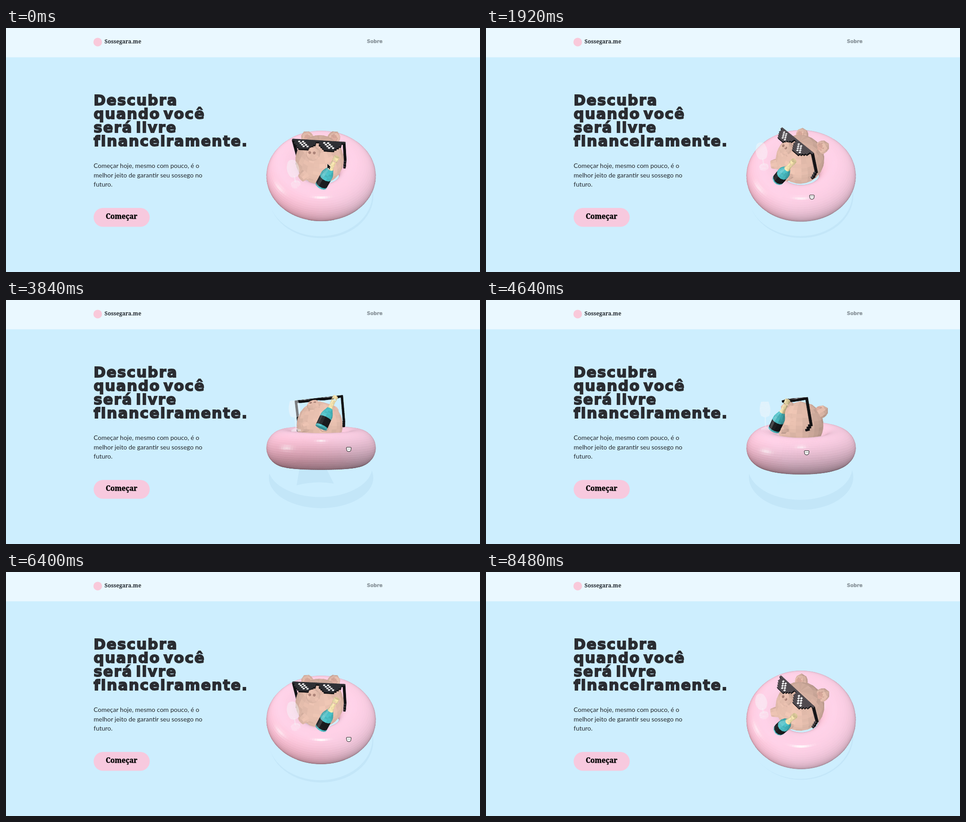
These frames come from a looping animation (1044 by 537 pixels, 8.64 s). An HTML page with a canvas:

```html
<!DOCTYPE html>
<html lang="pt-BR">
<head>
<meta charset="utf-8">
<title>Sossegara.me</title>
<style>
  html, body { margin: 0; width: 100%; height: 100%; overflow: hidden; background: #cdeefe; }
  svg, canvas { position: absolute; left: 0; top: 0; width: 1044px; height: 537px; display: block; }
  .wide { font-family: "DejaVu Sans", sans-serif; font-weight: 700; }
  .slab { font-family: "Noto Serif", serif; font-weight: 900; }
  .title { font-size: 32px; letter-spacing: 2px; word-spacing: -6px; fill: #2a2c31; stroke: #2a2c31; stroke-width: 2px; }
  .copy { font: 14px Lato, sans-serif; fill: #24292e; }
</style>
</head>
<body>
<svg viewBox="0 0 1044 537">
  <rect width="1044" height="64.500" fill="#eaf8ff"/>
  <circle cx="202" cy="31" r="9.500" fill="#f9c9da"/>
  <text class="slab" x="217" y="34" font-size="11.8" fill="#22282e">Sossegara.me</text>
  <text class="wide" x="795" y="33" font-size="10.4" fill="#8f9aa1" stroke="#8f9aa1" stroke-width=".5">Sobre</text>
  <g class="wide title">
    <text x="193" y="170">Descubra</text>
    <text x="193" y="200">quando você</text>
    <text x="193" y="230">será livre</text>
    <text x="193" y="260">financeiramente.</text>
  </g>
  <g class="copy">
    <text x="193" y="308">Começar hoje, mesmo com pouco, é o</text>
    <text x="193" y="329">melhor jeito de garantir seu sossego no</text>
    <text x="193" y="349">futuro.</text>
  </g>
  <rect x="193" y="396" width="123.500" height="41.500" rx="20.700" fill="#f7c9de"/>
  <text class="slab" x="254.500" y="420" font-size="15.5" text-anchor="middle" stroke="#000" stroke-width=".4">Começar</text>
</svg>
<canvas id="stage" width="1044" height="537"></canvas>
<script>
const ctx = document.getElementById('stage').getContext('2d');
const LOOP = 8640, STEP = 160, CX = 694, CY = 325.5, DIST = 700;
const GRAB = 480, DROP = 7360, GONE = 8000;

// Camera poses: time, azimuth, elevation.
const POSES = [
  [GRAB, 0, 47.7], [1920, -42, 49], [3040, -70, 50.3], [3840, 0, 5.7],
  [5440, -110, 20.5], [6400, 0, 45.4], [DROP, -40, 58.2]
];

const add = (a, b, k = 1) => a.map((v, i) => v + b[i] * k);
const dot = (a, b) => a[0] * b[0] + a[1] * b[1] + a[2] * b[2];
const cross = (a, b) => [a[1] * b[2] - a[2] * b[1], a[2] * b[0] - a[0] * b[2], a[0] * b[1] - a[1] * b[0]];
const norm = a => { const l = Math.hypot(...a) || 1; return a.map(v => v / l); };
const mix = (a, b, k) => a.map((v, i) => v + (b[i] - v) * k);
const clamp = (v, lo = 0, hi = 1) => Math.min(hi, Math.max(lo, v));
const ease = (a, b, v) => { const k = clamp((v - a) / (b - a)); return k * k * (3 - 2 * k); };
const times = (n, fn) => Array.from({ length: n }, (_, i) => fn(i));

let seed = 7;
const rand = () => (seed = seed * 16807 % 2147483647) / 2147483647;

// ---- model ----
const WHITE = [255, 255, 255], SKIN = [236, 195, 178], DARK = [48, 49, 54];
const TEAL = [70, 185, 192], LABEL = [22, 24, 27], FOIL = [237, 219, 166];
const faces = [];

function face(pts, mid, mat, col, extra) {
  const c = [0, 1, 2].map(i => pts.reduce((s, p) => s + p[i], 0) / pts.length);
  let n = norm(cross(add(pts[2], pts[0], -1), add(pts[3], pts[1], -1)));
  if (dot(n, add(c, mid, -1)) < 0) n = n.map(v => -v);
  faces.push({ pts, c, n, mat, col, j: rand() - .5, ...extra });
}

// Surface of revolution from p to q with radius(t), closed at both ends.
function lathe(p, q, radius, rows, sides, mat, col, extra) {
  const w = add(q, p, -1), mid = add(p, w, .5);
  const u = norm(cross(w, Math.abs(w[0]) > Math.abs(w[1]) ? [0, 1, 0] : [1, 0, 0]));
  const v = norm(cross(w, u));
  const rings = times(rows + 1, i => [i / rows, radius(i / rows)]);
  const shape = [[0, 0], ...rings, [1, 0]];
  const at = ([t, r], j) => {
    const g = j / sides * Math.PI * 2;
    return add(add(add(p, w, t), u, r * Math.cos(g)), v, r * Math.sin(g));
  };
  for (let i = 0; i + 1 < shape.length; i++) {
    const a = shape[i], b = shape[i + 1];
    if (a[0] === b[0] && a[1] === b[1]) continue;
    for (let j = 0; j < sides; j++)
      face([at(a, j), at(a, j + 1), at(b, j + 1), at(b, j)], mid, mat,
        typeof col === 'function' ? col((a[0] + b[0]) / 2) : col, extra);
  }
}

function ball(c, axis, r, rows, sides, col = SKIN) {
  lathe(add(c, axis, -1), add(c, axis), t => 2 * r * Math.sqrt(t * (1 - t)), rows, sides, 'skin', col);
}

function torus(R, r, nu, nv) {
  const at = (i, j, k = r) => {
    const g = i / nu * Math.PI * 2, h = j / nv * Math.PI * 2, d = R + k * Math.cos(h);
    return [d * Math.cos(g), k * Math.sin(h), d * Math.sin(g)];
  };
  for (let i = 0; i < nu; i++)
    for (let j = 0; j < nv; j++)
      face([at(i, j), at(i + 1, j), at(i + 1, j + 1), at(i, j + 1)], at(i + .5, 0, 0),
        'rubber', [255, 209, 231], { flat: true });
}

// Frame of the sunglasses: right, up, out of the lens.
const RIGHT = norm([.97, .1, .2]), UP = norm([.18, .146, -.955]), OUT = norm([-.1, .98, .14]);
const SPEC = [-6, 106, 7], PX = 3.85;

function pixel(x, y, z, col) {
  const h = PX / 2, axes = [RIGHT, UP, OUT];
  const c = add(add(add(SPEC, RIGHT, x * PX), UP, y * PX), OUT, z * PX);
  for (let k = 0; k < 3; k++)
    for (const s of [-h, h]) {
      const o = add(c, axes[k], s), a = axes[(k + 1) % 3], b = axes[(k + 2) % 3];
      face([[-h, -h], [h, -h], [h, h], [-h, h]].map(([m, n]) => add(add(o, a, m), b, n)), c, 'plastic', col);
    }
}

function glasses() {
  for (let x = 0; x < 26; x++) pixel(x - 12.5, 0, 0, DARK);
  for (const start of [1, 14])
    for (let row = 1; row < 6; row++) {
      const cut = Math.max(0, row - 2);
      for (let k = cut; k < 11 - cut; k++) {
        const check = row < 5 && k > row && k < row + 5 && (k + row) % 2;
        pixel(start + k - 12.5, -row, 0, check ? WHITE : DARK);
      }
    }
  for (const x of [-13, 13.3])
    for (let i = 0; i < 17; i++) {
      const drop = Math.max(0, i - 13);
      pixel(x, -drop, -i, DARK);
      if (drop) pixel(x, 1 - drop, -i, DARK);
    }
}

function pig() {
  const body = [-3, 50, 0], snout = norm([-.25, .82, .5]), tip = add(body, snout, 57);
  ball(body, [0, 51, 0], 50, 14, 24);
  lathe(add(body, snout, 40), tip, t => 14 - 3 * t ** 4, 4, 12, 'skin', SKIN);
  for (const s of [-4.5, 4.5]) {
    const p = add(tip, RIGHT, s);
    lathe(p, add(p, snout), () => 2.4, 1, 7, 'skin', [176, 134, 123]);
  }
  for (const x of [-28, 26]) {
    const ear = [x, 79, -34];
    ball(ear, norm(add(ear, body, -1)).map(v => v * 16), 13, 6, 10);
    ball(add(ear, [0, 5, 5]), [0, 6, 6], 8, 4, 8, [222, 174, 160]);
  }
  const limb = (a, b) => lathe(a, b, t => 12 - 4 * t * t, 4, 9, 'skin', SKIN);
  limb([-22, 49, 30], [-40, 46, 48]);
  limb([6, 50, 38], [6, 47, 58]);
  limb([-14, 18, 28], [-16, 10, 40]);
}

function drinks() {
  const bottle = t => 11.8 - 7.8 * ease(.36, .7, t) + (t > .87 ? 1 : 0);
  const paint = t => t < .06 || t > .3 && t < .6 ? TEAL : t < .3 ? LABEL : FOIL;
  lathe([0, 47, 68], [29, 108.7, 52], bottle, 20, 12, 'gloss', paint);
  const goblet = t => t < .06 ? 9.5 : t < .45 ? 1.2 : 8 + 3.6 * Math.sin((t - .45) / .55 * Math.PI);
  lathe([-50, 39, 60], [-54, 100, 58], goblet, 18, 16, 'glass', [247, 247, 252], { alpha: .28 });
}

torus(80, 40, 110, 48);
pig();
glasses();
drinks();

// ---- shading ----
const KEY = norm([.05, .5, .85]), WARM = norm([-.75, -.25, .6]), SIDE = norm([-.62, .15, .77]);

const shade = {
  rubber(f, n, cam) {
    const rim = (1 - clamp(n[2])) ** 5;
    const k = 1 - .46 * ((1 - f.n[1]) / 2) ** 1.5 - .16 * rim - .04 * n[0];
    const w = clamp(dot(f.n, WARM)) * .08;
    const glint = clamp(dot(n, cam.half)) ** 420 + .6 * clamp(dot(n, SIDE)) ** 110;
    return mix([f.col[0] * k, f.col[1] * (k - w), f.col[2] * (k - w)], WHITE, clamp(glint) * .85);
  },
  skin(f) {
    const k = .84 + .17 * dot(f.n, KEY) + f.j * .055;
    return f.col.map(v => v * k);
  },
  plastic(f, n, cam) {
    if (f.col === WHITE) return WHITE;
    const lit = dot(f.n, OUT) > .9 || dot(f.n, UP) > .9;
    return lit ? mix(DARK, [107, 97, 101], clamp(-cam.az / 70)) : [17, 17, 19];
  },
  gloss(f, n) {
    const k = .82 + .22 * dot(f.n, KEY) + f.j * .12;
    return mix(f.col.map(v => v * k), WHITE, .25 * clamp(dot(n, SIDE)) ** 12);
  },
  glass: f => f.col
};

// ---- drawing ----
function pose(t) {
  const i = POSES.findIndex(p => p[0] > t);
  if (i < 1) return POSES[i ? POSES.length - 1 : 0].slice(1);
  const a = POSES[i - 1], b = POSES[i];
  return mix(a, b, ease(a[0], b[0], t)).slice(1);
}

function drawShadow(el) {
  const c = Math.cos(el * Math.PI / 180), s = Math.sin(el * Math.PI / 180);
  const y = CY + 66 * c, ry = 63 + 40 * s;
  ctx.save();
  ctx.fillStyle = 'rgba(150,190,220,.17)';
  ctx.beginPath();
  ctx.rect(0, 65, 1044, 472);
  ctx.ellipse(CX - 2, y - 1 - 24 * c ** 5, 115, ry, 0, 0, 7);
  ctx.clip('evenodd');
  ctx.beginPath();
  ctx.ellipse(CX, y, 115, ry, 0, 0, 7);
  ctx.fill();
  ctx.restore();
  // The figure's own shadow shows only near the horizon.
  ctx.fillStyle = `rgba(150,190,220,${.17 * ease(14, 7, el)})`;
  ctx.beginPath();
  ctx.moveTo(647, 368);
  ctx.lineTo(640, 408);
  ctx.quadraticCurveTo(680, 397, 722, 404);
  ctx.lineTo(704, 368);
  ctx.fill();
}

function drawModel(az, el) {
  const a = az * Math.PI / 180, e = el * Math.PI / 180;
  const ca = Math.cos(a), sa = Math.sin(a), ce = Math.cos(e), se = Math.sin(e);
  const turn = ([x, y, z]) => {
    const d = z * ca - x * sa;
    return [x * ca + z * sa, y * ce - d * se, y * se + d * ce];
  };
  const cam = { az, half: norm([0, ce, 1.4 + se]) };
  const list = [];
  for (const f of faces) {
    const n = turn(f.n), c = turn(f.c);
    const view = f.flat ? [0, 0, 1] : [-c[0], -c[1], DIST - c[2]];
    if (f.alpha || dot(n, view) > 0) list.push({ f, n, z: c[2] });
  }
  list.sort((p, q) => p.z - q.z);
  ctx.lineWidth = .7;
  ctx.lineJoin = 'round';
  for (const { f, n } of list) {
    const rgb = shade[f.mat](f, n, cam).map(v => Math.round(clamp(v, 0, 255)));
    ctx.beginPath();
    for (const p of f.pts) {
      const [x, y, z] = turn(p), k = f.flat ? 1 : DIST / (DIST - z);
      ctx.lineTo(CX + x * k, CY - y * k);
    }
    ctx.closePath();
    ctx.fillStyle = ctx.strokeStyle = `rgba(${rgb},${f.alpha || 1})`;
    ctx.fill();
    if (!f.alpha) ctx.stroke();
  }
}

function drawFist() {
  const blob = new Path2D();
  for (let i = 0; i < 4; i++) {
    blob.moveTo(-1.2 + 2 * i, -2.3);
    blob.arc(-3 + 2 * i, -2.3, 1.8, 0, 7);
  }
  blob.moveTo(4.4, .5);
  blob.ellipse(0, .5, 4.4, 3.9, 0, 0, 7);
  ctx.lineWidth = 2;
  ctx.strokeStyle = '#222';
  ctx.stroke(blob);
  ctx.fillStyle = '#fff';
  ctx.fill(blob);
  ctx.fillStyle = '#555';
  for (let i = -1; i < 2; i++) ctx.fillRect(2 * i - .3, -1.5, .7, 2);
}

function drawArrow() {
  const tip = new Path2D('M0 0V10.500L2.500 8.300L4.200 12L6 11.200L4.400 7.700H7.500Z');
  ctx.lineWidth = 1;
  ctx.strokeStyle = '#fff';
  ctx.stroke(tip);
  ctx.fillStyle = '#000';
  ctx.fill(tip);
}

// While dragging, the pointer follows the camera angles.
function drawCursor(t, az, el) {
  const drag = [755 + az / 1.13, 323 + el];
  const pos = t < GRAB ? mix([708, 299], drag, ease(0, GRAB, t)) : mix(drag, [750, -30], ease(DROP, GONE, t));
  ctx.save();
  ctx.translate(...pos);
  if (t >= GRAB && t < DROP) drawFist();
  else drawArrow();
  ctx.restore();
}

function draw(t) {
  const [az, el] = pose(t);
  ctx.clearRect(0, 0, 1044, 537);
  drawShadow(el);
  drawModel(az, el);
  drawCursor(t, az, el);
}

const start = performance.now();
let last = -1;
function tick() {
  const step = Math.floor((performance.now() - start) % LOOP / STEP);
  if (step !== last) draw((last = step) * STEP);
  requestAnimationFrame(tick);
}
tick();
</script>
</body>
</html>
```
